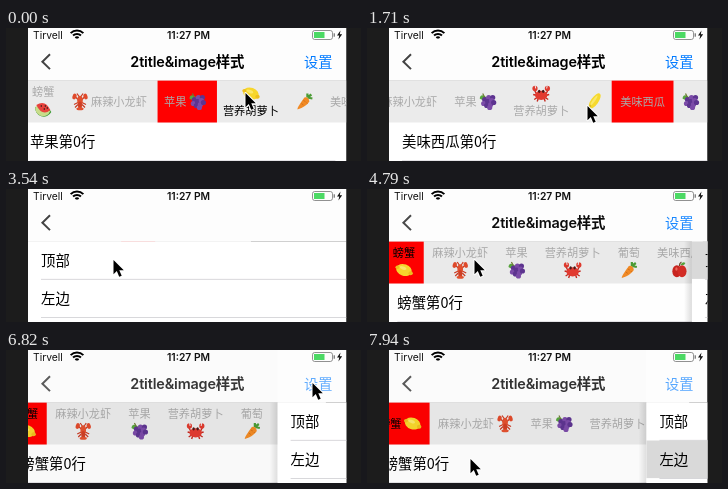
Recreate the animation shown at these times as an HTML page with a canvas. Size 355x133 px, loop 8000 ms.

```html
<!DOCTYPE html>
<html lang="zh-CN">
<head>
<meta charset="utf-8">
<title>Category strip</title>
<style>
  html, body { margin: 0; width: 100%; height: 100%; overflow: hidden; background: #1c1c1c; }
  canvas { display: block; width: 355px; height: 133px; }
</style>
</head>
<body>
<canvas id="stage"></canvas>
<script>
const LOOP = 8000, LEFT = 22, WIDTH = 318.5, RIGHT = LEFT + WIDTH;
const NAV_END = 52.3, STRIP_END = 94.5, ROW = 37.6, MARGIN = 13;
const CHAR = 11.2, ICON = 17, ICON_GAP = 2.5, GAP = 17;
const CJK = '"Noto Sans CJK SC", "Noto Sans CJK", sans-serif';
const LATIN = `Inter, ${CJK}`;

const canvas = document.getElementById('stage');
const ratio = window.devicePixelRatio || 1;
canvas.width = 355 * ratio;
canvas.height = 133 * ratio;
const c = canvas.getContext('2d');
c.scale(ratio, ratio);

const items = [
  { name: '螃蟹', icon: 'watermelon', active: 'lemon' },
  { name: '麻辣小龙虾', icon: 'lobster', active: 'corn' },
  { name: '苹果', icon: 'grapes', active: 'corn' },
  { name: '营养胡萝卜', icon: 'crab', active: 'lemon' },
  { name: '葡萄', icon: 'carrot', active: 'corn' },
  { name: '美味西瓜', icon: 'apple', active: 'corn' },
  { name: '香蕉', icon: 'grapes', active: 'corn' }
];
const mixed = ['bottom', 'left', 'right', 'top', 'image', 'title', 'image'];

// ---- motion ----
const clamp = v => Math.min(1, Math.max(0, v));
const lerp = (a, b, p) => a + (b - a) * p;
const smooth = p => p * p * (3 - 2 * p);
const spring = ms => ms <= 0 ? 0 : 1 - (1 + 0.0164 * ms) * Math.exp(-0.0164 * ms);

// Tap on an item: start time, from, to
const taps = [[-36, 2, 3], [690, 3, 5], [1708, 5, 4]];

// Pointer tip: time, x, y
const pointer = [
  [0, 239, 65], [150, 239, 65], [400, 276, 58], [1240, 276, 58], [1470, 220, 78],
  [1950, 220, 78], [2410, 310, 30], [2950, 310, 30], [3360, 101, 81], [3400, 101, 81],
  [3540, 107, 71], [5000, 107, 71], [5300, 94, 82], [5420, 313, 32], [5560, 313, 34],
  [5780, 269, 67], [5950, 313, 38], [6150, 313, 38], [6530, 306, 33], [7050, 306, 33],
  [7470, 103, 109], [LOOP, 103, 109]
];

function pointerAt(t) {
  const i = pointer.findIndex(k => k[0] > t);
  const [t0, x0, y0] = pointer[i - 1], [t1, x1, y1] = pointer[i];
  const p = smooth((t - t0) / (t1 - t0));
  return [lerp(x0, x1, p), lerp(y0, y1, p)];
}

function coverAt(t) {
  if (t < 4500) return spring(t - 2620);
  if (t < 6700) return 1 - spring(t - 4500);
  if (t < 7755) return spring(t - 6768);
  return 1 - spring(t - 7755);
}

// ---- drawing helpers ----
function text(str, x, y, size, color, { font = CJK, weight = 400, align = 'left', spacing = 0 } = {}) {
  c.font = `${weight} ${size}px ${font}`;
  c.letterSpacing = spacing + 'px';
  c.textAlign = align;
  c.textBaseline = 'alphabetic';
  c.fillStyle = color;
  c.fillText(str, x, y + size * 0.37);
}

function rect(x, y, w, h, color) {
  c.fillStyle = color;
  c.fillRect(x, y, w, h);
}

function oval(x, y, rx, ry, color, turn = 0) {
  c.fillStyle = color;
  c.beginPath();
  c.ellipse(x, y, rx, ry, turn, 0, 7);
  c.fill();
}

function path(d, color, width) {
  const p = new Path2D(d);
  if (width) {
    c.strokeStyle = color;
    c.lineWidth = width;
    c.stroke(p);
  } else {
    c.fillStyle = color;
    c.fill(p);
  }
}

function at(x, y, draw) {
  c.save();
  c.translate(x, y);
  draw();
  c.restore();
}

// Icons fill a box of about 17 px around the origin.
const icons = {
  watermelon() {
    path('M-8 -2A8.5 8.5 0 0 0 8 3L6 0Z', '#3c9a35');
    path('M-7.5 -3A7.5 7.5 0 0 0 7 2Z', '#c8dc8a');
    path('M-7 -4Q2 -10 7 1Q-1 8 -7 -4', '#e8413c');
    [[-2, -3], [2, -3], [1, 0], [4, -1]].forEach(([x, y]) => oval(x, y, 0.7, 0.9, '#46251f'));
  },
  lobster() {
    path('M-2 -2L-5 -5M2 -2L5 -5M-2 1L-6 3M2 1L6 3M-2 3L-5 6M2 3L5 6M-1 -5L-3 -8M1 -5L3 -8', '#c93a22', 1.2);
    oval(-5.5, -5, 2, 3, '#e04a2b', 0.3);
    oval(5.5, -5, 2, 3, '#e04a2b', -0.3);
    oval(0, -1, 2.8, 4.8, '#e2512f');
    oval(0, 4, 2, 4, '#cf3f25');
    oval(0, 7.2, 3.6, 1.5, '#e2512f');
  },
  grapes() {
    path('M-1 -4Q-7 -9 -8 -3Q-4 0 -1 -4', '#58a53e');
    path('M-3 -4L-5 -8', '#6b7a32', 1.2);
    [[-3, -2], [1, -4], [5, -4], [-4, 2], [0, 0], [4, -1], [-1, 4], [3, 3], [6, 1], [2, 6]]
      .forEach(([x, y], i) => oval(x, y, 2.6, 2.6, i % 2 ? '#7b4ba8' : '#5d3490'));
  },
  crab() {
    path('M-4 2L-8 1M4 2L8 1M-4 4L-7 6M4 4L7 6M-3 5L-4 8M3 5L4 8M-5 0L-7 -4M5 0L7 -4', '#c5291f', 1.4);
    oval(-6.2, -5, 2.6, 2.8, '#df3a2e');
    oval(6.2, -5, 2.6, 2.8, '#df3a2e');
    path('M-6 -8L-5.5 -5M6 -8L5.5 -5', '#ebebeb', 1);
    oval(0, 1.8, 6.2, 4.6, '#e23a30');
    oval(-2, -2.2, 1.2, 1.6, '#4a1a18');
    oval(2, -2.2, 1.2, 1.6, '#4a1a18');
  },
  carrot() {
    path('M3 -4L3 -8M3 -4L7 -7M3 -4L8 -3', '#4b9c35', 2.2);
    path('M0 -4Q4 -5 5 0Q2 5 -7 8Q-8 7 0 -4', '#f18a25');
    path('M-1 -1L1 0M-3 2L-1 3.5M2 1L3 2', '#cf6a16', 0.8);
  },
  apple() {
    path('M0 -4Q0 -7 2 -8', '#6a4425', 1.3);
    path('M1 -5Q3 -9 6 -7Q5 -4 1 -5', '#55a33a');
    oval(-2.6, 1.3, 4.5, 6, '#c9241f');
    oval(2.6, 1.3, 4.5, 6, '#d42c25');
    oval(-3, -1, 1.2, 1.8, '#ec6a5c');
  },
  lemon() {
    oval(0, 0, 8, 5.8, '#f7d62c', 0.35);
    oval(6.6, 3.2, 2.2, 2, '#eebf1e');
    oval(-6.6, -2.8, 2, 1.8, '#eebf1e');
    oval(-1, -2, 3.5, 1.5, '#fbe769', 0.35);
  },
  corn() {
    oval(0, -0.5, 3.7, 9, '#f6d92e', 0.62);
    oval(-0.8, -1, 1.2, 6, '#fae86a', 0.62);
    path('M-7 8Q-7 4 -4 3Q-2 6 -7 8', '#dcbc28');
  }
};

// ---- category strip ----
const contentWidth = (item, kind) => {
  const title = item.name.length * CHAR;
  if (kind === 'image') return ICON;
  return kind === 'left' || kind === 'right' ? title + ICON_GAP + ICON : title;
};

function layout(kinds) {
  let x = LEFT + GAP / 2;
  const cells = items.map((item, i) => {
    const cell = { x, w: contentWidth(item, kinds[i]), kind: kinds[i] };
    x += cell.w + GAP;
    return cell;
  });
  const max = x - GAP / 2 - RIGHT;
  cells.forEach(cell => {
    cell.scroll = Math.min(max, Math.max(0, cell.x + cell.w / 2 - LEFT - WIDTH / 2));
  });
  return cells;
}

const layouts = {
  mixed: layout(mixed),
  bottom: layout(items.map(() => 'bottom')),
  right: layout(items.map(() => 'right'))
};

function drawCell(item, cell, selected) {
  const { x, w, kind } = cell, middle = x + w / 2;
  const titleLeft = kind === 'left' ? x + ICON + ICON_GAP : x;
  const titleY = { top: 83, bottom: 64 }[kind] || 73.5;
  const iconX = { left: x + ICON / 2, right: x + w - ICON / 2 }[kind] || middle;
  const iconY = { top: 65.5, bottom: 81 }[kind] || 73.5;
  if (kind !== 'image') text(item.name, titleLeft, titleY, CHAR, selected ? '#000' : '#a9a9a9');
  if (kind !== 'title') at(iconX, iconY, icons[selected ? item.active : item.icon]);
}

function drawHome(t, cover) {
  const kind = t < 4500 ? 'mixed' : t < 7755 ? 'bottom' : 'right';
  const cells = layouts[kind];
  let from = 0, to = 0, p = 1;
  if (kind === 'mixed') {
    const tap = taps.filter(k => k[0] <= t).pop();
    [, from, to] = tap;
    p = smooth(clamp((t - tap[0]) / 330));
  }
  const a = cells[from], b = cells[to];

  c.save();
  c.translate(-cover * 0.3 * WIDTH, 0);
  rect(LEFT, NAV_END, WIDTH, 90, '#fff');
  c.beginPath();
  c.rect(LEFT, NAV_END, WIDTH, 90);
  c.clip();
  rect(LEFT, NAV_END, WIDTH, STRIP_END - NAV_END, '#ebebeb');

  at(-lerp(a.scroll, b.scroll, p), 0, () => {
    rect(lerp(a.x, b.x, p) - GAP / 2, NAV_END, lerp(a.w, b.w, p) + GAP, STRIP_END - NAV_END, '#f00');
    cells.forEach((cell, i) => drawCell(items[i], cell, i === to));
  });

  const page = lerp(from, to, p);
  items.forEach((item, i) => {
    const x = LEFT + (i - page) * WIDTH;
    if (Math.abs(i - page) >= 1) return;
    text(item.name + '第0行', x + MARGIN, 113.5, 14.4, '#000');
    rect(x + MARGIN, 132, WIDTH - MARGIN, 0.5, '#c8c7cc');
  });
  c.restore();
  rect(LEFT, NAV_END, WIDTH, 90, `rgba(0,0,0,${0.1 * cover})`);
}

function drawSettings(t, cover) {
  const x = LEFT + (1 - cover) * WIDTH;
  const pressed = t >= 4500 && t < 5300 ? 0 : t >= 7710 ? 1 : -1;
  const shade = c.createLinearGradient(x - 8, 0, x, 0);
  shade.addColorStop(0, 'rgba(0,0,0,0)');
  shade.addColorStop(1, `rgba(0,0,0,${0.14 * (1 - cover)})`);
  rect(x - 8, NAV_END, 8, 90, shade);
  rect(x, NAV_END, WIDTH, 90, '#fff');
  ['顶部', '左边'].forEach((label, i) => {
    const y = NAV_END + i * ROW + (i ? 0.6 : 0);
    if (i === pressed) rect(x, y, WIDTH, ROW, '#d9d9d9');
    text(label, x + MARGIN, y + 19, 14.4, '#000');
    rect(x + MARGIN, y + ROW, WIDTH - MARGIN, 0.7, '#c8c7cc');
  });
}

function drawBars(cover) {
  rect(LEFT, 0, WIDTH, NAV_END, '#fdfdfd');
  rect(LEFT, 0, (1 - cover) * WIDTH, NAV_END, `rgba(0,0,0,${0.04 * cover})`);

  text('Tirvell', 27, 7, 10.3, '#111', { font: LATIN });
  for (const r of [10, 6.6, 3.2]) {
    c.beginPath();
    c.arc(71, 11.5, r - 1, -Math.PI * 0.75, -Math.PI * 0.25);
    c.strokeStyle = '#000';
    c.lineWidth = 2;
    c.stroke();
  }
  text('11:27 PM', 182.5, 7, 10.3, '#111', { font: LATIN, weight: 600, align: 'center' });

  c.strokeStyle = '#777';
  c.lineWidth = 0.8;
  c.beginPath();
  c.roundRect(306.5, 2.5, 20, 9, 2.2);
  c.stroke();
  rect(308, 4, 10.5, 6, '#4cd964');
  rect(327.6, 5.3, 1.3, 3.4, '#777');
  path('M334.5 2.5L331 7.5H333.3L332.4 11.5L336.2 6.2H333.8Z', '#111');

  c.globalAlpha = 1 - 0.8 * cover * (1 - cover);
  path('M44 26.3L36.4 33.7L44 41.1', '#444', 2);
  c.globalAlpha = 1 - cover;
  text('2title&image样式', 181.3, 34, 14.4, '#000', { font: LATIN, weight: 600, align: 'center', spacing: -0.15 });
  c.globalAlpha = (1 - cover) ** 2;
  text('设置', 298, 34, 14.2, '#007aff');
  c.globalAlpha = 1;
}

function drawPointer(t) {
  const [x, y] = pointerAt(t);
  at(x, y, () => {
    const arrow = 'M0.5 0V14.2L3.8 11.1L6.2 16.8L8.7 15.7L6.3 10.2H10.8Z';
    c.lineJoin = 'round';
    path(arrow, '#fff', 2);
    path(arrow, '#000');
    c.lineJoin = 'miter';
  });
}

function draw() {
  const t = performance.now() % LOOP;
  const cover = coverAt(t);
  rect(0, 0, 355, 133, '#1c1c1c');
  c.save();
  c.beginPath();
  c.rect(LEFT, 0, WIDTH, 133);
  c.clip();
  drawHome(t, cover);
  if (cover > 0.001) drawSettings(t, cover);
  drawBars(cover);
  c.restore();
  drawPointer(t);
  requestAnimationFrame(draw);
}
draw();
</script>
</body>
</html>
```
